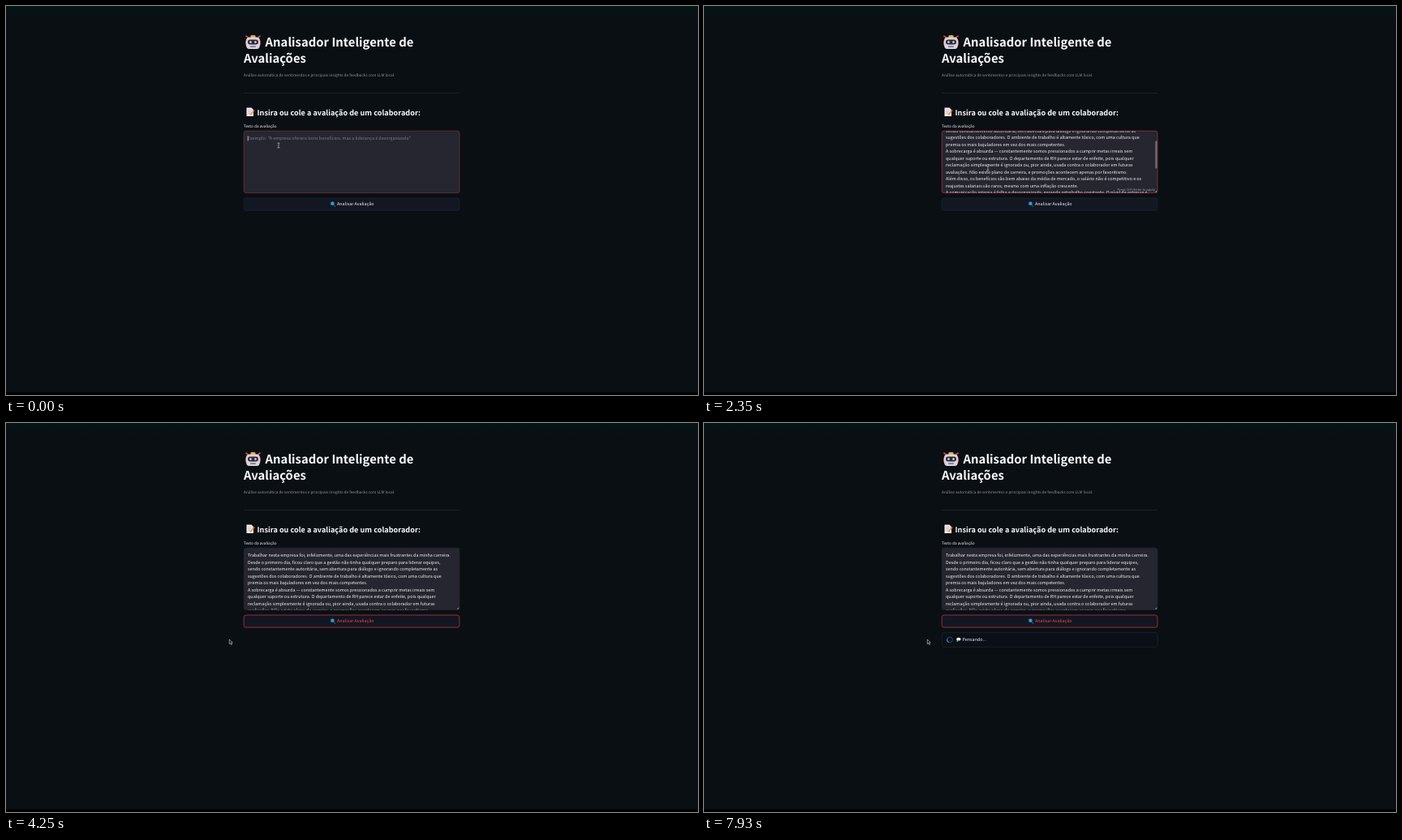
These frames come from a looping animation (853 px wide and 480 px high, 7990 ms). An HTML page:

```html
<!DOCTYPE html>
<html lang="pt-BR">
<head>
<meta charset="utf-8">
<title>Analisador Inteligente de Avaliações</title>
<style>
html, body { margin: 0; width: 100%; height: 100%; overflow: hidden; background: #0a0f14; }
svg { display: block; width: 853px; height: 480px; }
text {
  font-family: "Noto Sans CJK JP", "Noto Sans CJK SC", "Noto Sans CJK", "Noto Sans", sans-serif;
  font-size: 5.41px; fill: #f4f4f6; text-rendering: geometricPrecision;
}
.title { font-size: 14.85px; font-weight: 700; fill: #fafafa; }
.head { font-size: 9.15px; font-weight: 600; fill: #fafafa; }
.small { font-size: 4.76px; }
.hint { font-size: 4.05px; fill: #9a9aa2; }
</style>
</head>
<body>
<svg viewBox="0 0 853 480" xmlns="http://www.w3.org/2000/svg">
  <defs>
    <linearGradient id="top" x2="0" y2="1">
      <stop stop-color="#041514"/><stop offset="1" stop-color="#0a0f14"/>
    </linearGradient>
    <clipPath id="inside"><rect x="293.5" y="154.4" width="265" height="76"/></clipPath>
  </defs>
  <rect width="853" height="480" fill="#0a0f14"/>
  <rect width="853" height="16" fill="url(#top)"/>
  <rect y="476.7" width="853" height="3.3" fill="#000"/>

  <!-- robot -->
  <g>
    <path d="M298 38.5l-2-1.2M311 38.5l2-1.2" stroke="#d8443c" stroke-width="1.8" stroke-linecap="round"/>
    <rect x="295" y="42" width="19" height="7" rx="2" fill="#d8453f"/>
    <rect x="301.5" y="36" width="6" height="4" rx="1.3" fill="#f0a63a"/>
    <path d="M300 38.5h9q4 0 4 4.5v5q0 5-4 5h-9q-4 0-4-5v-5q0-4.500 4-4.500z" fill="#d9d3dd"/>
    <rect x="298" y="41.500" width="13" height="6" rx="3" fill="#2b2b38"/>
    <circle cx="301.500" cy="44.500" r="1.300" fill="#d8e8ee"/>
    <circle cx="307.500" cy="44.500" r="1.300" fill="#d8e8ee"/>
    <rect x="301" y="49.300" width="7" height="1.800" rx=".9" fill="#83788d"/>
  </g>
  <text class="title" x="319.6" y="50.4">Analisador Inteligente de</text>
  <text class="title" x="293" y="70.4">Avaliações</text>
  <text class="small" x="293" y="87.1" fill-opacity=".58">Análise automática de sentimentos e principais insights de feedbacks com LLM local.</text>
  <path d="M293 107.500h266" stroke="#202a2e" stroke-width=".7"/>

  <!-- memo -->
  <g>
    <path d="M296.500 125.500h6l2.500 2.500v8h-8.500z" fill="#eeeaf0"/>
    <path d="M298 128.500h4.500M298 130.500h4M298 132.500h3" stroke="#a6a0b0" stroke-width=".6"/>
    <path d="M301 134.500l4.500-5.500" stroke="#ef9a36" stroke-width="1.900"/>
    <path d="M305 129.600l1-1.200" stroke="#e4484f" stroke-width="1.900"/>
  </g>
  <text class="head" x="309.600" y="134.500">Insira ou cole a avaliação de um colaborador:</text>
  <text class="small" x="293" y="149.800">Texto da avaliação</text>

  <rect id="area" x="293.200" y="154.200" width="265.800" height="76.400" rx="2.500" fill="#25262f" stroke-width=".7"/>
  <g clip-path="url(#inside)">
    <g id="empty">
      <text x="298" y="165.300" style="fill:#7b7c84">Exemplo: "A empresa oferece bons benefícios, mas a liderança é desorganizada."</text>
      <path id="caret" d="M298.200 160.300v6.400" stroke="#f0f0f2" stroke-width=".6"/>
    </g>
    <g id="filled">
      <g id="lines"></g>
      <text class="hint" id="hint" x="556" y="228" text-anchor="end">Press Ctrl+Enter to apply</text>
      <path d="M556.300 229.700l2-2M557.600 229.800l.8-.8" stroke="#d8d8dc" stroke-width=".6"/>
      <rect id="thumb" x="556.400" y="154.500" width="2.400" height="34" rx="1" fill="#747579"/>
    </g>
  </g>

  <rect id="button" x="293.200" y="237" width="265.800" height="15.200" rx="2.800" fill="#121721" stroke-width=".7"/>
  <path d="M403.800 245.300l2 2" stroke="#38536e" stroke-width="1.200" stroke-linecap="round"/>
  <circle cx="402.400" cy="243.700" r="2.200" fill="#3a9be0" stroke="#28608f" stroke-width=".6"/>
  <text id="action" x="408" y="246.200" font-weight="500">Analisar Avaliação</text>

  <g id="status">
    <rect x="293.200" y="258.600" width="265.800" height="17.800" rx="2.800" fill="#0b1016" stroke="#1b2632" stroke-width=".7"/>
    <circle cx="303" cy="267.400" r="3.300" fill="none" stroke="#234a70" stroke-width="1"/>
    <path id="spin" d="M303 264.100a3.300 3.300 0 0 1 3.300 3.300" fill="none" stroke="#428fc8" stroke-width="1"/>
    <g fill="#ececf2">
      <ellipse cx="313.900" cy="266.700" rx="2.700" ry="1.900"/>
      <circle cx="312.300" cy="269" r=".7"/>
    </g>
    <text x="318.500" y="269.400">Pensando...</text>
  </g>

  <path id="beam" d="M-1.600-3q1.600 0 1.600.8v4.400q0 .8-1.600.8M1.600-3q-1.600 0-1.600.8M1.600 3q-1.600 0-1.600-.8" fill="none" stroke="#c9c9cf" stroke-width=".7"/>
  <path id="arrow" d="M0 0v5.600l1.300-1.200 1 2.200 1-.5-1-2.100h1.700z" fill="#10131a" stroke="#d4d6da" stroke-width=".6"/>
</svg>
<script>
const LOOP = 7990, PASTE = 1020, HOVER = 3300, CLICK = 3490, THINK = 4380, STEP = 8.52;
const $ = id => document.getElementById(id);
const copy = [
  "Trabalhar nesta empresa foi, infelizmente, uma das experiências mais frustrantes da minha carreira.",
  "Desde o primeiro dia, ficou claro que a gestão não tinha qualquer preparo para liderar equipes,",
  "sendo constantemente autoritária, sem abertura para diálogo e ignorando completamente as",
  "sugestões dos colaboradores. O ambiente de trabalho é altamente tóxico, com uma cultura que",
  "premia os mais bajuladores em vez dos mais competentes.",
  "A sobrecarga é absurda — constantemente somos pressionados a cumprir metas irreais sem",
  "qualquer suporte ou estrutura. O departamento de RH parece estar de enfeite, pois qualquer",
  "reclamação simplesmente é ignorada ou, pior ainda, usada contra o colaborador em futuras",
  "avaliações. Não existe plano de carreira, e promoções acontecem apenas por favoritismo.",
  "Além disso, os benefícios são bem abaixo da média de mercado, o salário não é competitivo e os",
  "reajustes salariais são raros, mesmo com uma inflação crescente.",
  "A comunicação interna é falha e desorganizada, gerando retrabalho constante. O nível de estresse é",
  "altíssimo, e é comum ver pessoas com sintomas de burnout, sem que a empresa faça absolutamente",
  "nada a respeito. A alta liderança vive em uma bolha, alheia à realidade dos times operacionais."
];
copy.forEach((line, i) => {
  const el = document.createElementNS("http://www.w3.org/2000/svg", "text");
  el.setAttribute("x", 298);
  el.setAttribute("y", 165.3 + i * STEP);
  el.textContent = line;
  $("lines").append(el);
});

// Keys are [time, ...values], eased between neighbours.
const scrollKeys = [[1970, 0], [2650, 45], [2920, 45], [3260, 0]];
const mouseKeys = [[200, 336, 172], [1500, 347, 190], [1970, 347, 190], [2650, 352, 207],
  [2920, 352, 207], [3360, 362, 244], [3560, 362, 244], [4050, 275.3, 267]];

function track(keys, t) {
  const i = keys.findIndex(k => k[0] > t);
  if (i === 0) return keys[0].slice(1);
  if (i < 0) return keys[keys.length - 1].slice(1);
  const a = keys[i - 1], b = keys[i];
  const p = (t - a[0]) / (b[0] - a[0]), e = p * p * (3 - 2 * p);
  return a.slice(1).map((v, n) => v + (b[n + 1] - v) * e);
}
const show = (id, on) => $(id).setAttribute("visibility", on ? "visible" : "hidden");
const move = (id, x, y) => $(id).setAttribute("transform", `translate(${x} ${y})`);

function draw(t) {
  const pasted = t >= PASTE, focus = t < CLICK, hot = t >= HOVER;
  const [scroll] = track(scrollKeys, t), [x, y] = track(mouseKeys, t);
  show("empty", !pasted);
  show("caret", !pasted && t % 1000 < 500);
  show("filled", pasted);
  show("hint", pasted && focus);
  show("thumb", pasted && t < HOVER);
  move("lines", 0, -scroll);
  move("thumb", 0, scroll * 0.455);
  $("area").setAttribute("stroke", focus ? (pasted ? "#a93c45" : "#7d3440") : "#25262f");
  $("button").setAttribute("stroke", hot ? "#cf3a43" : "#202733");
  $("action").style.fill = hot ? "#f0444a" : "#f4f4f6";
  show("status", t >= THINK);
  $("spin").setAttribute("transform", `rotate(${(t - THINK) * 0.36} 303 267.4)`);
  const text = y < 231 && t < CLICK;
  show("beam", text);
  show("arrow", !text);
  move("beam", x, y);
  move("arrow", x, y);
}

const start = performance.now();
function tick() {
  draw((performance.now() - start) % LOOP);
  requestAnimationFrame(tick);
}
tick();
</script>
</body>
</html>
```
